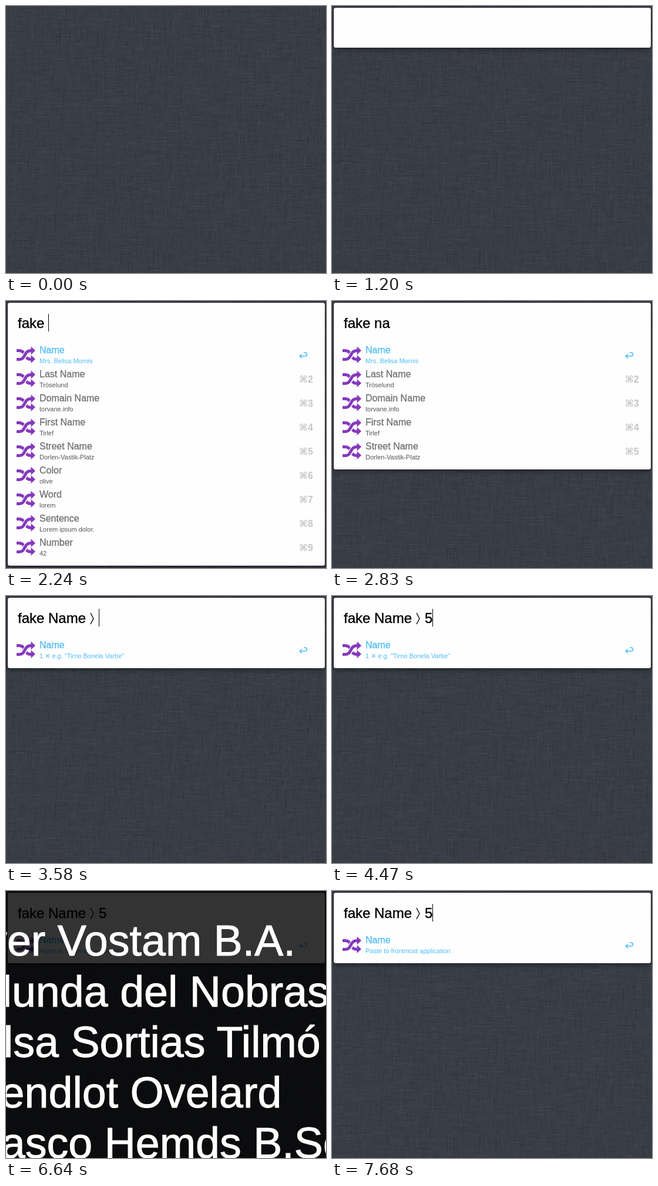
Recreate the animation shown at these times as an HTML page with a canvas. Size 545 px wide and 455 px high, loop 8 s.

```html
<!DOCTYPE html>
<html lang="en">
<head>
<meta charset="utf-8">
<title>Fake data launcher</title>
<style>
  html, body { margin: 0; width: 100%; height: 100%; overflow: hidden; background: #393d46; }
  canvas, svg { position: absolute; left: 0; top: 0; width: 545px; height: 455px; }
  text { font-family: "Liberation Sans", Arial, sans-serif; white-space: pre; }
  .query { font-size: 24px; fill: #000; stroke: #000; stroke-width: .4; }
  .title { font-size: 16px; fill: #707070; stroke: #707070; stroke-width: .3; }
  .sub { font-size: 11px; fill: #555; }
  .active .title, .active .sub { fill: #4fbcf5; }
  .active .title { stroke: #4fbcf5; }
  .key { font: bold 16px "Liberation Sans", "DejaVu Sans", sans-serif; fill: #c6c6c6; }
  .panel { fill: #fefefe; filter: drop-shadow(0 2px 5px rgba(0, 0, 0, .5)); }
  .large { font-size: 72px; fill: #fff; stroke: #fff; stroke-width: 1; text-anchor: end; }
</style>
</head>
<body>
<canvas id="linen" width="545" height="455"></canvas>
<svg id="stage" viewBox="0 0 545 455"></svg>
<script>
const LOOP = 8000, ROW = 41;
const stage = document.getElementById("stage");
const ctx = document.getElementById("linen").getContext("2d");

// Woven background: short random threads in both directions
function drawLinen() {
  let seed = 7;
  const random = () => (seed = (seed * 16807) % 2147483647) / 2147483647;
  ctx.fillStyle = "#393d46";
  ctx.fillRect(0, 0, 545, 455);
  for (let i = 0; i < 16000; i++) {
    const length = 4 + random() * 20;
    const x = Math.floor(random() * 570 - 25), y = Math.floor(random() * 480 - 25);
    ctx.fillStyle = i % 4 < 2 ? "rgba(255,255,255,.018)" : "rgba(0,0,0,.06)";
    i % 2 ? ctx.fillRect(x, y, length, 1) : ctx.fillRect(x, y, 1, length);
  }
}

const configure = ["Configure Fakum Locales", "Turn locales on/off"];
const generate = ["Generate Fake Data", "Faking up some stuff…"];
const found = [configure, generate];
const broad = [...found, ["Find", "Search for files"], ["Files", "Browse all files"],
  ["Folders", "Browse all folders"], ["Fonts", "Show installed fonts"],
  ["Favourites", "Show saved items"], ["Firewall", "Open settings"], ["Format", "Open settings"]];
const names = [["Name", "Mrs. Belisa Mornis"], ["Last Name", "Tröselund"],
  ["Domain Name", "torvane.info"], ["First Name", "Tirlef"], ["Street Name", "Dorlen-Vastik-Platz"]];
const kinds = [...names, ["Color", "olive"], ["Word", "lorem"], ["Sentence", "Lorem ipsum dolor."], ["Number", "42"]];
const sample = count => [["Name", count + ' ✕ e.g. "Tirno Bonela Varbe"']];
const paste = [["Name", "Paste to frontmost application"]];

const scenes = [
  [600, "", []],
  [1490, "f", broad],
  [1640, "fak", found],
  [1790, "fake", found],
  [2090, "fake ", found],
  [2240, "fake ", kinds],
  [2390, "fake n", kinds],
  [2530, "fake na", kinds],
  [2830, "fake na", names],
  [3430, "fake Name〉", names],
  [3580, "fake Name〉", sample(1)],
  [4470, "fake Name〉5", sample(1)],
  [4620, "fake Name〉5", sample(5)],
  [5520, "fake Name〉5", paste]
];
const caretOff = [[1200, 1490], [2830, 3430], [4920, 5370], [6640, 7240]];

// [text, right edge]
const largeType = [["Halver Vostam B.A.", 488], ["Velunda del Nobras", 544],
  ["Orelsa Sortias Tilmó", 530], ["Wendlot Ovelard", 465], ["Durasco Hemds B.Sc.", 590]];

const text = (cls, x, y, s) => `<text class="${cls}" x="${x}" y="${y}">${s}</text>`;

const shuffle = `<g fill="none" stroke="#8439bd" stroke-width="5">
  <path d="M18 84.5H22C35 84.5 29 99.5 43 99.5"/>
  <path d="M27 98C33 95 32 89 38 86" stroke="#fefefe" stroke-width="8"/>
  <path d="M18 99.5H22C35 99.5 29 84.5 43 84.5"/></g>
  <path fill="#8439bd" d="M42.5 77.5L50 84.5L42.5 91.5ZM42.5 92L50 99L42.5 106Z"/>`;

const returnKey = `<path fill="none" stroke="#4fbcf5" stroke-width="1.6"
  d="M501 94H509.5a3 3 0 0 0 0-6H507M504 90.5L500.3 94L504 97.5"/>`;

function row([title, sub], i) {
  const key = i ? text("key", 499, 98, "⌘") + text("key", 514, 98, i + 1) : returnKey;
  return `<g class="${i ? "" : "active"}" transform="translate(0 ${i * ROW})">
    ${shuffle}${text("title", 57, 89, title)}${text("sub", 57, 106, sub)}${key}</g>`;
}

function queryLine(query, showCaret) {
  const [head, tail] = query.split("〉");
  const nested = tail !== undefined;
  ctx.font = '24px "Liberation Sans", Arial, sans-serif';
  const caretX = Math.floor((nested ? 158 : 20) + ctx.measureText(nested ? tail : head).width);
  return text("query", 20, 46, head)
    + (nested ? '<path d="M144 29L149 38.5L144 48" fill="none" stroke="#000" stroke-width="1.4"/>'
      + text("query", 158, 46, tail) : "")
    + (showCaret ? `<rect x="${caretX}" y="22" width="1" height="30"/>` : "");
}

function largeOverlay(opacity, zoom) {
  const lines = largeType.map(([s, right], i) => text("large", right, 113 + 84.3 * i, s)).join("");
  return `<g opacity="${opacity}" transform="translate(272.5 227.5) scale(${zoom}) translate(-272.5 -227.5)">
    <rect x="-60" y="5" width="700" height="445" fill="#000" fill-opacity=".8"/>${lines}</g>`;
}

function picture(t) {
  const scene = scenes.filter(s => s[0] <= t).pop();
  if (!scene) return "";
  const [, query, rows] = scene;
  const height = rows.length ? 79 + rows.length * ROW : 68;
  const showCaret = !caretOff.some(([from, to]) => t >= from && t < to);
  let out = `<g opacity="${t < 750 ? .5 : 1}">
    <rect class="panel" x="3" y="3" width="540" height="${height}" rx="3.5"/>
    ${queryLine(query, showCaret)}${rows.map(row).join("")}</g>`;
  if (t >= 5960 && t < 6230) out += largeOverlay(.135, 1);
  else if (t >= 6230 && t < 7680) out += largeOverlay(t < 7530 ? 1 : .5, 1.0225);
  return out;
}

let shown = null;
function tick() {
  const next = picture(performance.now() % LOOP);
  if (next !== shown) stage.innerHTML = shown = next;
  requestAnimationFrame(tick);
}

drawLinen();
tick();
</script>
</body>
</html>
```
